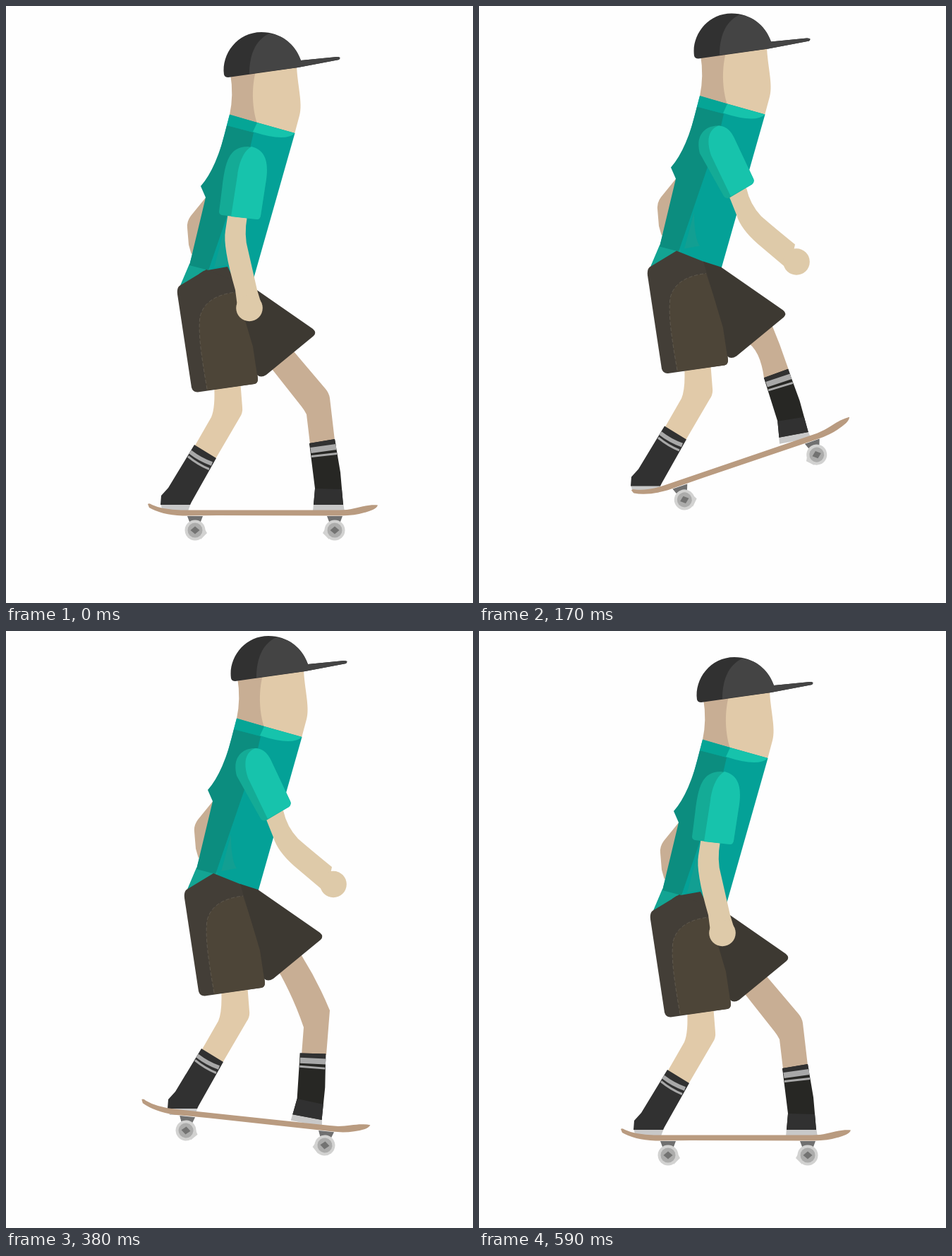
Write an HTML page that moves like this. It is 662 by 845 pixels and loops after 0.62 s.

```html
<!DOCTYPE html>
<html lang="en">
<head>
<meta charset="utf-8">
<title>Skater</title>
<style>
  html, body { margin: 0; height: 100%; overflow: hidden; background: #fefefe; }
  svg { display: block; width: 100%; height: 100%; }
  .skin { fill: #e1caa9; }
  .arm { fill: #decaa9; }
  .shade { fill: #c8ae94; }
  .dark { fill: #313131; }
  .shoe { fill: #c8c8c8; }
  .stripe { fill: none; stroke: #a8a8a8; }
</style>
</head>
<body>
<svg viewBox="0 0 662 845">
  <defs>
    <g id="wheel">
      <path fill="#707070" d="M-11-20H11L8-12H-8Z"/>
      <path fill="#d2d2d1" d="M8-12L17 4L8 13Z"/>
      <circle r="14.5" fill="#d2d2d1"/>
      <circle r="10.5" fill="#acacab"/>
      <path fill="#737372" d="M-6.5 0L0-5.5L6.5 0L0 5.5Z"/>
    </g>
  </defs>

  <g id="skater">
    <!-- far arm and leg -->
    <path class="shade" d="M284 270L262 297Q256 305 257 314L259 338L263 352L287 300Z"/>
    <path class="shade" id="leg"/>
    <g id="foot">
      <path class="shoe" d="M436 704H478L480 715H435Z"/>
      <path fill="#272724" d="M430 619L466 613L474 660L478 706H436L438 683Z"/>
      <path class="dark" d="M430 619L466 613L468 624L432 629ZM438 683L476 684L478 706H436Z"/>
      <path class="stripe" stroke-width="8" d="M432 629L468 624"/>
      <path class="stripe" stroke-width="3" d="M433 637.5L469 633.5"/>
    </g>

    <!-- near leg -->
    <path class="skin" d="M295 535L332 530L335 568Q336 576 331 583L297 641L268 622L291 582Q297 568 295 535Z"/>
    <path class="shoe" d="M219 704H262L258 715H222Z"/>
    <path class="dark" d="M267 621L298 640L263 702L261 706H219L220 693L230 682Z"/>
    <path class="stripe" stroke-width="6" d="M261 631Q275 642 292 648"/>
    <path class="stripe" stroke-width="3" d="M258 637.5Q272 649 288 655.5"/>

    <g id="board">
      <use href="#wheel" x="268" y="742"/>
      <use href="#wheel" transform="translate(466 742) scale(-1 1)"/>
      <path fill="#b99b80" d="M201 705Q203 703 207 706Q222 713 248 713.5H470C495 714 506 705 527 706.5Q526 710 520 713Q500 721.5 475 721.5L300 721L250 721.5Q220 720 203 710Z"/>
    </g>

    <!-- head -->
    <path class="shade" d="M318 96Q323 126 317 154L360 167L358 90Z"/>
    <path class="skin" d="M354 92L412 84C413 112 421 138 416 155L409 181L356 166C350 148 347 120 354 92Z"/>
    <path class="dark" d="M309 97C305 68 328 37 362 37C390 37 409 54 418 77L469 72Q476 72 472 76L414 87L315 101Q310 101 309 97Z"/>
    <path fill="#444" d="M373 39C352 49 345 72 345 96L414 87L472 76Q476 72 469 72L418 77C411 57 396 42 373 39Z"/>

    <!-- shirt -->
    <path fill="#04a197" d="M317 154L409.5 180L347.5 398L284 392L247 397L260 367Z"/>
    <path fill="#13a493" d="M260 365L290 372L284 392L246 398Z"/>
    <path fill="#0c8d7f" d="M313 169L351 179L345 205L287 374L260 367L283 271L276 255Q299 229 313 169Z"/>
    <path fill="#129f92" d="M295 370L309 318Q309 355 317 366Z"/>
    <path fill="#05a596" d="M317 153.5L356 165L351 179L313 169Z"/>
    <path fill="#16c3ac" d="M356 165L409.5 180Q396 193 350 178Z"/>

    <!-- shorts -->
    <path fill="#433e37" id="waist" d="M274 379L280 375L314 369L330 400H274Z"/>
    <path fill="#433e37" d="M246 396L284 373L324 389L352 482L357 528Q357 534 352 535L272 546.5Q265 547 263 540L243 408Q242 399 246 396Z"/>
    <path fill="#4d4538" d="M285 544C277 496 272 463 275 440Q282 410 326 405L352 482L357 528Q357 534 352 535Z"/>
    <path fill="none" stroke="#655f54" stroke-width=".8" stroke-dasharray="5 3" d="M285 542C277 496 272 463 275 440Q282 410 326 405"/>
    <path fill="#3d3932" d="M322 388L347 396L435 457Q441 462 436 467L369 522Q361 527 356 522L350 482Z"/>

    <!-- near arm -->
    <path class="arm" id="arm"/>
    <circle class="arm" id="hand" r="18.8"/>
    <path fill="#14ab96" id="sleeve"/>
    <path fill="#17c3ac" id="sleeveLight"/>
  </g>
</svg>
<script>
const $ = id => document.getElementById(id);

const bentArm = {
  arm: 'M357 292L383 284Q388 307 404 324Q420 338 452 364L444 401L399 363Q375 342 369 322Z',
  hand: [454, 388.5],
  sleeve: 'M317 235C310 208 326 196 342 196C356 196 363 206 368 218L393 271Q395 276 391 279L359 298Q353 300 350 294Z',
  sleeveLight: 'M361 296L333 238C325 214 331 201 343 196C356 196 363 206 368 218L393 271Q395 276 391 279Z'
};

// Foot and board: dx, dy, degrees around their own pivots.
const ride = {
  dx: 0,
  leg: 'M370 505L402 482L453 542Q458 548 459 555L466 615L431 620L426 578Q423 572 419 567Z',
  foot: [0, 0, 0],
  board: [0, 0, 0],
  arm: 'M315 292L342 297Q337 325 343 345L356 402L363 425L328 425L325 402Q307 340 311 318Z',
  hand: [345, 427.5],
  sleeve: 'M302 291C310 235 308 199 343 199C372 203 371 228 369 245L361 297Q360 302 356 302L306 296Q302 295 302 291Z',
  sleeveLight: 'M319 298L328 240C331 217 339 204 348 199C372 205 371 228 369 245L361 297Q360 302 356 302Z'
};
const pop = {
  ...bentArm,
  dx: -4,
  leg: 'M380 498L418 475Q432 508 443 542L408 553Q404 522 391 508Z',
  foot: [-23, -69.5, -10.4],
  board: [22, -48.5, -18.8]
};
const level = {
  ...bentArm,
  dx: 10,
  leg: 'M372 505L405 482L410 491Q432 526 449 567L444 630L409 630L412 591Q399 553 380 518Z',
  foot: [-23, 12, 10.8],
  board: [-23.5, 5.5, 6.1]
};

const FIRST = 30, STEP = 70, LOOP = 620;
const steps = [
  [ride, 0], [pop, -10.5], [pop, -21], [pop, -26.5], [pop, -32],
  [level, -36], [level, -30], [level, -25], [level, -19.5], [ride, 0]
];

function place(id, [x, y, angle], pivot) {
  $(id).setAttribute('transform', `translate(${x} ${y}) rotate(${angle} ${pivot})`);
}

function draw(now) {
  const t = now % LOOP;
  const [pose, lift] = steps[Math.max(0, Math.floor((t - FIRST) / STEP) + 1)];
  for (const id of ['leg', 'arm', 'sleeve', 'sleeveLight']) $(id).setAttribute('d', pose[id]);
  $('hand').setAttribute('cx', pose.hand[0]);
  $('hand').setAttribute('cy', pose.hand[1]);
  place('foot', pose.foot, '448 616');
  place('board', pose.board, '367 742');
  $('waist').style.display = pose === ride ? '' : 'none';
  $('skater').setAttribute('transform', `translate(${pose.dx} ${lift})`);
  requestAnimationFrame(draw);
}
draw(performance.now());
</script>
</body>
</html>
```
